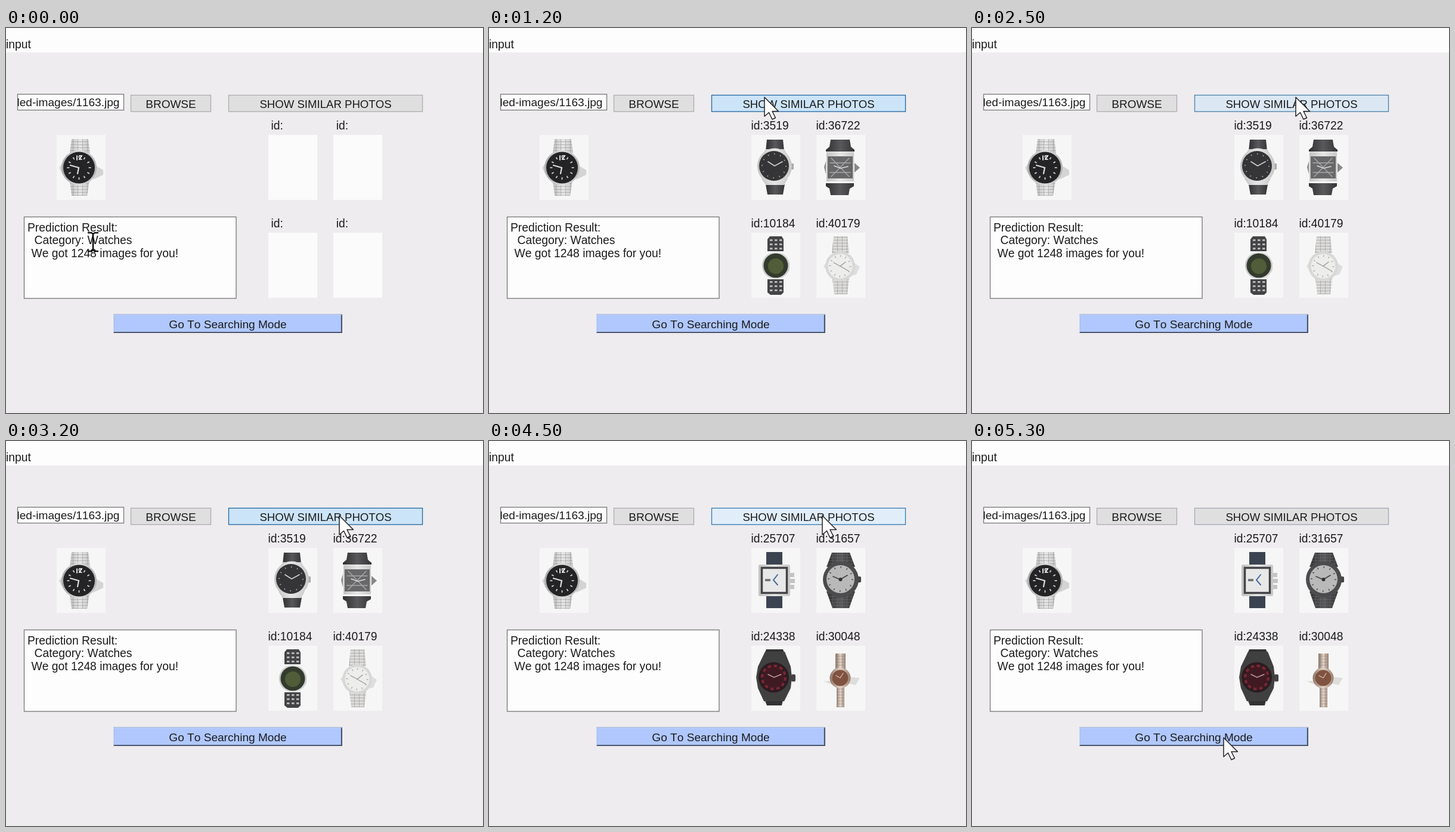
An HTML page that plays this animation: 800x645 px, repeating every 5400 ms.

```html
<!DOCTYPE html>
<html lang="en">
<head>
<meta charset="utf-8">
<title>Similar photo search</title>
<style>
  html, body { margin: 0; width: 100%; height: 100%; overflow: hidden; background: #eeecee; }
  svg { display: block; width: 800px; height: 645px; }
  text { font: 19.3px "Liberation Sans", Arial, sans-serif; font-kerning: none; fill: #1b1b1c; white-space: pre; }
  .mid { text-anchor: middle; }
  .paper { fill: #fcfbfc; }
  .photo { fill: #f7f6f6; }
  .watch { filter: blur(.6px); }
  .field { fill: #fdfdfd; stroke: #777; stroke-width: 1.3; }
  .button { fill: #e0dfe0; stroke: #adadad; stroke-width: 1.3; }
  .line { fill: none; stroke-linecap: round; }
  .arrow { fill: #fff; stroke: #222; stroke-width: 1.5; stroke-linejoin: round; }

  .show, .cursor, .empty, .first, .second, .beam, .arrow { animation: 5400ms infinite; }
  .show { animation-name: hover; }
  .cursor { animation-name: travel; }
  .empty, .first, .second, .beam, .arrow { animation-timing-function: step-end; }
  .empty { animation-name: empty; }
  .first { animation-name: first; }
  .second { animation-name: second; }
  .beam { animation-name: beam; }
  .arrow { animation-name: arrow; }

  @keyframes empty { 0% { opacity: 1 } 22.22%, 100% { opacity: 0 } }
  @keyframes first { 0% { opacity: 0 } 22.22% { opacity: 1 } 64.81%, 100% { opacity: 0 } }
  @keyframes second { 0% { opacity: 0 } 64.81%, 100% { opacity: 1 } }
  @keyframes beam { 0% { opacity: 1 } 3.7%, 100% { opacity: 0 } }
  @keyframes arrow { 0% { opacity: 0 } 3.7%, 100% { opacity: 1 } }

  /* steps() holds the pointer for 100 ms at a time */
  @keyframes travel {
    0%     { transform: translate(146px, 358px); animation-timing-function: steps(6); }
    11.11% { transform: translate(462px, 116px); }
    24.07% { transform: translate(462px, 116px); animation-timing-function: steps(4); }
    31.48% { transform: translate(381px, 469px); animation-timing-function: steps(1); }
    33.33% { transform: translate(376px, 483px); }
    38.88% { transform: translate(376px, 483px); animation-timing-function: steps(4); }
    46.29% { transform: translate(543px, 116px); animation-timing-function: steps(2); }
    50%    { transform: translate(559px, 125px); }
    85.18% { transform: translate(559px, 125px); animation-timing-function: steps(5); }
    94.44% { transform: translate(424px, 505px); animation-timing-function: steps(2); }
    98.14%, 100% { transform: translate(422px, 497px); }
  }
  @keyframes hover {
    0%, 11.11% { fill: #e0dfe0; stroke: #adadad; }
    14.81%     { fill: #e0e9f3; stroke: #4583b5; }
    18.51%, 22.22% { fill: #cce4f7; stroke: #1f66a3; }
    25.92%     { fill: #e3effa; stroke: #2f7ec0; }
    29.62%, 44.44% { fill: #e0dfe0; stroke: #a2a8af; }
    46.29%     { fill: #dbe8f4; stroke: #4a7fa8; }
    50%, 55.55% { fill: #e2effa; stroke: #2a78b8; }
    57.4%, 66.66% { fill: #cce4f7; stroke: #1f66a3; }
    70.37%     { fill: #d8e9f6; stroke: #2670ae; }
    75.92%, 87% { fill: #e1eefa; stroke: #2f7ab5; }
    92%, 100%  { fill: #e0dfe0; stroke: #a2a8b2; }
  }
</style>
</head>
<body>
<svg viewBox="0 0 800 645">
  <defs>
    <clipPath id="entry"><rect x="20" y="111" width="177" height="26"/></clipPath>
    <linearGradient id="steel">
      <stop stop-color="#a8a8a8"/><stop offset=".5" stop-color="#dedede"/><stop offset="1" stop-color="#b2b2b2"/>
    </linearGradient>
    <linearGradient id="pale">
      <stop stop-color="#c2c2c2"/><stop offset=".5" stop-color="#e6e6e6"/><stop offset="1" stop-color="#c8c8c8"/>
    </linearGradient>
    <linearGradient id="dark">
      <stop stop-color="#303032"/><stop offset=".5" stop-color="#59595b"/><stop offset="1" stop-color="#343436"/>
    </linearGradient>
    <linearGradient id="copper">
      <stop stop-color="#8c7466"/><stop offset=".5" stop-color="#e2d3c7"/><stop offset="1" stop-color="#99806f"/>
    </linearGradient>
    <pattern id="links" width="8" height="5" patternUnits="userSpaceOnUse">
      <path d="M0 .5H8M.5 0V5" stroke="#777" stroke-opacity=".4" fill="none"/>
    </pattern>
    <pattern id="studs" x="470" y="353" width="8" height="7" patternUnits="userSpaceOnUse">
      <rect x="1" y="1" width="4.5" height="3" fill="#b5b5b5"/>
    </pattern>
    <g id="cards">
      <rect x="440" y="179" width="82" height="109"/><rect x="549" y="179" width="82" height="109"/>
      <rect x="440" y="343" width="82" height="109"/><rect x="549" y="343" width="82" height="109"/>
    </g>
  </defs>

  <rect width="800" height="645" fill="#eeecee"/>
  <rect width="800" height="41" fill="#fdfdfd"/>
  <text x="0" y="34">input</text>

  <rect class="field" x="19.5" y="111" width="178" height="26.5"/>
  <text x="18.5" y="131" clip-path="url(#entry)" style="font-size:19.1px">led-images/1163.jpg</text>
  <rect class="button" x="209.5" y="112.5" width="134" height="27.5"/>
  <text class="mid" x="276.5" y="134" style="font-size:19px">BROWSE</text>
  <rect class="button show" x="373.5" y="112.5" width="325" height="27.5"/>
  <text class="mid" x="536" y="134" style="font-size:18.6px">SHOW SIMILAR PHOTOS</text>

  <!-- chosen watch -->
  <rect class="photo" x="85" y="179" width="82" height="109"/>
  <g class="watch">
    <path d="M110 186h28l3 24h-34zM107 256h33l-4 25h-26z" fill="url(#pale)"/>
    <path d="M110 186h28l3 24h-34zM107 256h33l-4 25h-26z" fill="url(#links)"/>
    <path d="M148 229l15 9v8l-17 8zM95 226l-6 8 6 12z" fill="#d4d4d4"/>
    <circle cx="122.5" cy="234" r="29.5" fill="url(#steel)"/>
    <circle cx="122.5" cy="234" r="26.5" fill="#242426"/>
    <circle cx="122.5" cy="234" r="18" fill="none" stroke="#ccc" stroke-width="4" pathLength="12" stroke-dasharray=".2 .8" stroke-dashoffset=".1"/>
    <path class="line" d="M108 230l14 4-2 10" stroke="#ddd" stroke-width="2.2"/>
    <path d="M119 214v7M123 214h4l-4 6h4" class="line" stroke="#fff" stroke-width="1.7"/>
  </g>

  <rect class="field" x="30.5" y="316.5" width="355.5" height="136.5"/>
  <text x="36" y="340.5">Prediction Result:</text>
  <text x="47.5" y="362">Category: Watches</text>
  <text x="42.5" y="384">We got 1248 images for you!</text>

  <rect x="180" y="479.5" width="384" height="31.5" fill="#4a566e"/>
  <path d="M180 511V479.5H564l-2 1.5H181.5V509z" fill="#c4d4f8"/>
  <rect x="181.2" y="480.7" width="380.6" height="28.3" fill="#b0c8fe"/>
  <text class="mid" x="372" y="503" style="font-size:19.1px">Go To Searching Mode</text>

  <g class="empty">
    <use href="#cards" class="paper"/>
    <text x="444.4" y="169.5">id:</text><text x="553.8" y="169.5">id:</text>
    <text x="444.4" y="333.5">id:</text><text x="553.8" y="333.5">id:</text>
  </g>

  <g class="first">
    <use href="#cards" class="photo"/>
    <text x="439.4" y="169.5">id:3519</text><text x="548.4" y="169.5">id:36722</text>
    <text x="439.4" y="333.5">id:10184</text><text x="548.4" y="333.5">id:40179</text>

    <g class="watch">
      <!-- round, dark dial -->
      <path d="M466 187h27l2 19h-31zM464 262h32l-3 17h-26z" fill="url(#dark)"/>
      <path d="M464 203h31l6 10h-43zM457 252h44l-6 11h-31z" fill="url(#pale)"/>
      <rect x="505" y="227" width="6" height="10" fill="#aaa"/>
      <ellipse cx="479" cy="231.5" rx="29" ry="30" fill="url(#pale)"/>
      <circle cx="478" cy="231" r="25" fill="#353537"/>
      <circle cx="478" cy="231" r="20" fill="none" stroke="#aaa" stroke-width="2" pathLength="12" stroke-dasharray=".15 .85"/>
      <path class="line" d="M468 224l11 7 13-7" stroke="#ccc" stroke-width="1.8"/>

      <!-- square, dark strap -->
      <path d="M573 187h32l2 12 6 5v3h-48v-3l6-5zM565 260h47v5l-7 4-2 11h-30l-2-11-6-4z" fill="url(#dark)"/>
      <path d="M566 208h46v49h-46z" fill="url(#pale)"/>
      <path d="M565 223l-3 10 3 12zM613 226l9 8-9 8z" fill="#888"/>
      <rect x="568" y="215" width="42" height="37" fill="#68686a"/>
      <path class="line" d="M574 218l30 31M604 218l-30 31M572 226h34M572 242h34" stroke="#a8a8a8" stroke-width="1.4"/>
      <path class="line" d="M579 231l11 4 12-3" stroke="#ddd" stroke-width="1.6"/>

      <!-- round, green dial -->
      <path d="M471 349h20l3 5v20h-27v-20zM467 421h27v22l-4 4h-18l-5-4z" fill="#444446"/>
      <path d="M470 353h23v20h-23zM470 423h23v20h-23z" fill="url(#studs)"/>
      <path d="M498 386l6 7v13l-6 8z" fill="#d8d8d8"/>
      <circle cx="481" cy="398" r="23" fill="url(#pale)"/>
      <circle cx="481" cy="398" r="20.5" fill="#343b2e"/>
      <circle cx="481" cy="399" r="13" fill="#505d38"/>

      <!-- pale steel -->
      <path d="M578 349h23l3 28h-29zM576 420h28l-3 26h-22z" fill="#dbdad9"/>
      <path d="M578 349h23l3 28h-29zM576 420h28l-3 26h-22z" fill="url(#links)"/>
      <path d="M610 392l12 8-6 13-13 3zM568 390l-7 9 7 10z" fill="#dedede"/>
      <circle cx="589" cy="399" r="25" fill="#d8d8d7"/>
      <circle cx="589" cy="399" r="20.5" fill="#ededec"/>
      <circle cx="589" cy="399" r="17" fill="none" stroke="#aaa" stroke-width="3" pathLength="12" stroke-dasharray=".15 .85"/>
      <path class="line" d="M578 393l11 6 14 8M589 399l9-7" stroke="#999" stroke-width="1.4"/>
    </g>
  </g>

  <g class="second">
    <use href="#cards" class="photo"/>
    <text x="439.4" y="169.5">id:25707</text><text x="548.4" y="169.5">id:31657</text>
    <text x="439.4" y="333.5">id:24338</text><text x="548.4" y="333.5">id:30048</text>

    <g class="watch">
      <!-- square, blue strap -->
      <path d="M465 186h27v24h-27zM465 258h27v22h-27z" fill="#3c4350"/>
      <path d="M504 221h8v7h-8zM504 231h9v7h-9zM504 241h8v7h-8z" fill="#c4c4c4"/>
      <rect x="452" y="207" width="53" height="53" rx="3" fill="url(#pale)"/>
      <rect x="457.5" y="212.5" width="42" height="42" fill="#e8e8e9" stroke="#444446" stroke-width="3.5"/>
      <path class="line" d="M484 224l-7 9 7 8" stroke="#496998" stroke-width="2"/>
      <path d="M463 231h9v4h-9z" fill="#777"/>

      <!-- gunmetal, grey dial -->
      <path d="M575 187h30l9 24h-48zM566 252h48l-10 28h-28z" fill="url(#dark)"/>
      <path d="M575 187h30l9 24h-48zM566 252h48l-10 28h-28z" fill="url(#links)"/>
      <rect x="617" y="227" width="7" height="10" rx="2" fill="#444"/>
      <circle cx="590" cy="232" r="30" fill="#4c4c4e"/>
      <circle cx="589.5" cy="231.5" r="23.5" fill="#b9b9ba"/>
      <circle cx="589.5" cy="231.5" r="20" fill="none" stroke="#555" stroke-width="3" pathLength="12" stroke-dasharray=".15 .85"/>
      <path class="line" d="M577 227l12 5 12-7" stroke="#444" stroke-width="1.7"/>
      <circle cx="589.5" cy="232" r="3" fill="#333"/>

      <!-- black barrel, red dial -->
      <path d="M465 349h28l4 10h-36zM461 430h33l-3 13h-25z" fill="#333335"/>
      <path d="M463 353h33l10 25 2 18-2 18-11 22h-34l-10-22-3-18 3-18z" fill="#404041"/>
      <rect x="507" y="391" width="7" height="12" rx="2" fill="#444"/>
      <circle cx="477.5" cy="396" r="25.5" fill="#2c1c20"/>
      <circle cx="477.5" cy="396" r="19.5" fill="#401a22" stroke="#7c2635" stroke-width="4" pathLength="12" stroke-dasharray=".55 .45"/>
      <path class="line" d="M468 391l10 5 12-5" stroke="#c0a0a0" stroke-width="1.5"/>

      <!-- slim bracelet -->
      <path d="M581 356h17v27h-17zM583 412h13v34h-13z" fill="url(#copper)"/>
      <path d="M581 356h17v27h-17zM583 412h13v34h-13z" fill="url(#links)"/>
      <path d="M602 395l20 2-7 12-13-3zM575 401l-14 2 15 5z" fill="#dfdddb"/>
      <circle cx="589" cy="397" r="17.5" fill="url(#copper)"/>
      <circle cx="589" cy="397" r="13.5" fill="#805341"/>
      <path class="line" d="M582 393l7 4 5-8" stroke="#d8bfae" stroke-width="1.3"/>
    </g>
  </g>

  <g class="cursor">
    <path class="beam" d="M-9-15h6l3 2 3-2h6M0-13V14M-9 16h6l3-2 3 2h6" fill="none" stroke="#111" stroke-width="2.6"/>
    <path class="arrow" d="M0 0V32L7.5 25.5 13 37 18.5 34.5 13 23.5H23.5z"/>
  </g>
</svg>
</body>
</html>
```
